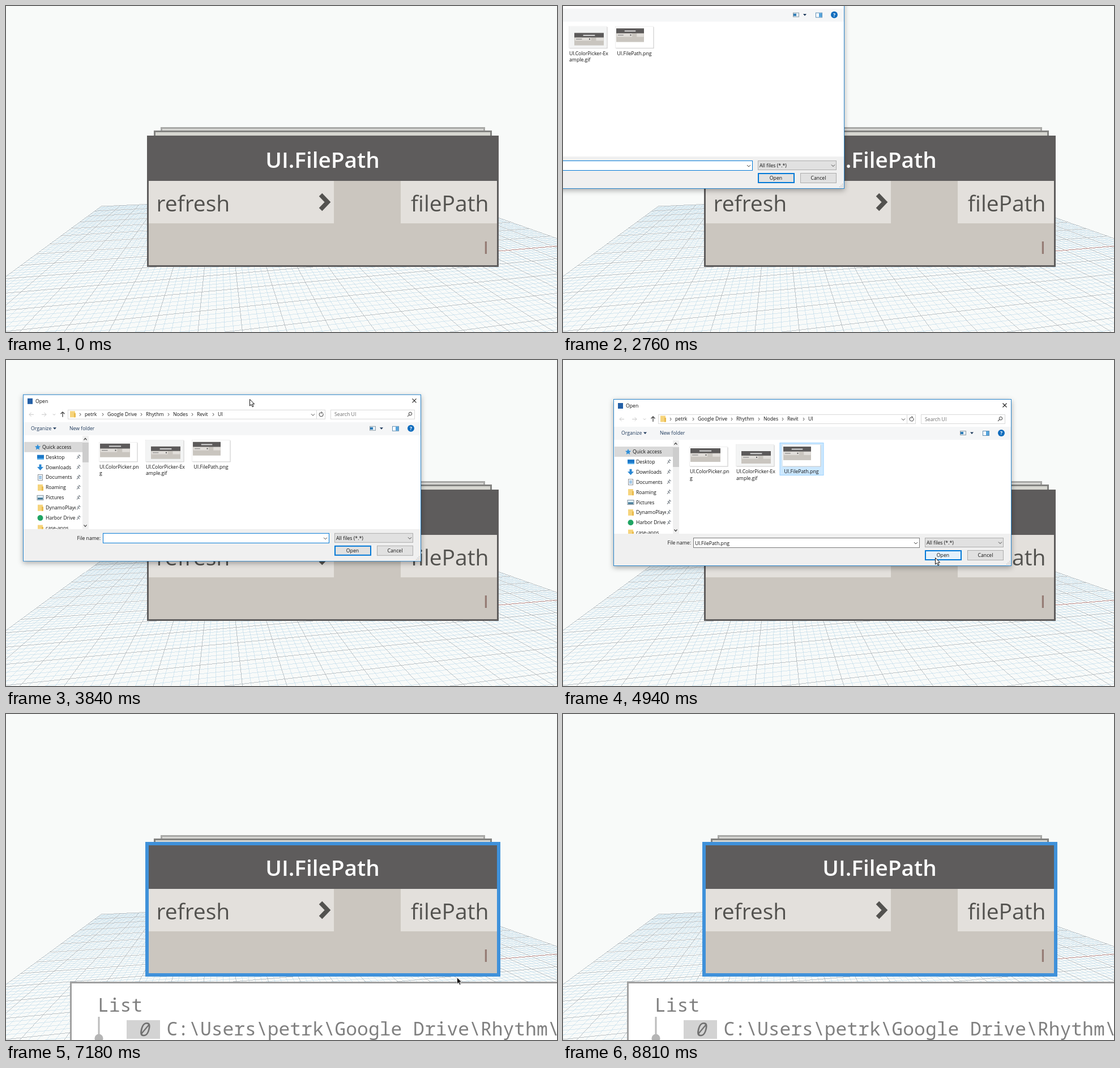
An HTML page that plays this animation: 973 px wide and 576 px high, repeating every 9590 ms.

```html
<!DOCTYPE html>
<html lang="en">
<head>
<meta charset="utf-8">
<title>File path node</title>
<style>
  html, body { margin: 0; width: 100%; height: 100%; overflow: hidden; background: #f8faf9; }
  svg { position: absolute; left: 0; top: 0; width: 973px; height: 576px; }
  text { font-family: "Open Sans", "Noto Sans", sans-serif; white-space: pre; }
  .port { font-size: 39px; fill: #53524f; }
  .mono { font: 33px "Noto Sans Mono", monospace; fill: #808080; }
  #dialog text { font-size: 8.7px; fill: #111; }
  #dialog { filter: drop-shadow(0 3px 5px rgba(0, 0, 0, .32)); }
</style>
</head>
<body>
<svg id="stage" viewBox="0 0 973 576"></svg>
<script>
const LOOP = 9590;
const $ = id => document.getElementById(id);

// ---------- svg helpers ----------
const rect = (x, y, w, h, fill, extra = '') =>
  `<rect x="${x}" y="${y}" width="${w}" height="${h}" fill="${fill}" ${extra}/>`;
const box = (x, y, w, h, fill, stroke, width = 1, extra = '') =>
  rect(x, y, w, h, fill, `stroke="${stroke}" stroke-width="${width}" ${extra}`);
const text = (x, y, s, extra = '') => `<text x="${x}" y="${y}" ${extra}>${s}</text>`;
const path = (d, stroke, width = 1, fill = 'none', extra = '') =>
  `<path d="${d}" stroke="${stroke}" stroke-width="${width}" fill="${fill}" ${extra}/>`;
const down = (x, y) => path(`M${x - 3} ${y - 1.5}l3 3l3 -3`, '#444');
const wedge = (x, y) => path(`M${x - 3} ${y - 1.5}h6l-3 3.5z`, 'none', 0, '#1e395b');
const folder = (x, y) => rect(x, y - 5.5, 9, 11, '#f6d47c') + rect(x + 7, y - 2, 3, 7.5, '#e9bb4e');

// perspective ground; thin lines without smoothing break up into dashes
function ground() {
  const corner = [168, 354], right = [3600, 200], far = [377, 200], near = 0.85;
  const project = (u, v) => {
    const a = 0.2 * u, b = -1.01 * v, w = 1 + a + b;
    return [0, 1].map(i => ((corner[i] + a * right[i] + b * far[i]) / w).toFixed(2)).join(' ');
  };
  const line = (u1, v1, u2, v2) => `M${project(u1, v1)}L${project(u2, v2)}`;
  let minor = '', major = '';
  for (let i = 0; i <= 100; i++) {
    const k = i / 100;
    const d = line(k, 0, k, near) + (k <= near ? line(0, k, 1, k) : '');
    if (i % 5) minor += d; else major += d;
  }
  return `<g shape-rendering="crispEdges">${path(minor, '#b2d3e6', .5)}${path(major, '#a3adb3', .7)}
    ${path(line(.5, .5, 1, .5), '#c58a86', .9)}</g>`;
}

function nodeCard() {
  return box(274.5, 215.5, 570, 20, '#d7d7d4', '#a9a9a7', 3) +
    box(262.5, 221.5, 594, 20, '#d6d6d0', '#838381', 3) +
    box(250.5, 230.5, 618, 229, '#cbc6bf', '#5e5c5c', 3) +
    rect(249, 229, 621, 80, '#5e5c5c') +
    rect(252, 309, 327, 75, '#e3e0dc') + rect(697, 309, 170, 75, '#e3e0dc') +
    text(559, 286, 'UI.FilePath', 'font-size="38.7" font-weight="600" fill="#fff" text-anchor="middle"') +
    text(265.5, 363, 'refresh', 'class="port"') +
    text(852.5, 363, 'filePath', 'class="port" text-anchor="end"') +
    path('M555.5 333.5L568 346.5L555.5 359.5', '#53524f', 7.7) +
    text(847.5, 438, 'l', 'font-size="28" font-weight="600" fill="#957c74" text-anchor="middle"') +
    box(249, 229, 621, 232, 'none', '#3f91da', 6, 'id="selected"');
}

function bubble() {
  return `<g id="bubble">${box(0, 474.5, 10, 10, '#fff', '#a0a0a0', 3, 'id="bubbleBox"')}
    ${text(0, 526, 'List', 'class="mono" id="listWord"')}
    <g id="listRow">${rect(162.5, 535, 3, 40, '#bcbcbc')}
    <circle cx="164" cy="573" r="7.5" fill="#b5b5b5"/>
    ${rect(213, 541, 59, 33, '#d3d3d3')}
    ${text(243, 569, '0', 'class="mono" text-anchor="middle" style="font-style:italic;fill:#707070"')}
    ${text(283.5, 568, 'C:\\Users\\petrk\\Google Drive\\Rhythm\\Nodes', 'class="mono"')}</g></g>`;
}

// small picture of a node
const mini = (x, y, w, h) => rect(x, y, w, h, '#c9c5bf') + rect(x, y, w, h * .36, '#5c5a5a') +
  rect(x + 1, y + h * .38, w * .55, h * .24, '#e1deda') + rect(x + w * .74, y + h * .38, w * .25, h * .24, '#e1deda') +
  rect(x + w * .3, y + h * .15, w * .4, 2, '#d8d8d8') + rect(x + 3, y + h * .47, w * .2, 1.2, '#888') +
  rect(x + w * .5, y + h * .45, 2, 2, '#555');
const thumb = (x, y, h) => rect(x + 1, y + 1, 67, h, '#c4c4c4') + box(x, y, 67, h, '#fff', '#e3e3e3', .6);

function sidebar() {
  const names = ['Quick access', 'Desktop', 'Downloads', 'Documents', 'Roaming', 'Pictures',
    'DynamoPlayer', 'Harbor Drive', 'case-apps'];
  const icons = [
    y => path(`M115 ${y - 5}l1.5 3.4l3.6 .4l-2.7 2.4l.8 3.6l-3.2 -1.8l-3.2 1.8l.8 -3.6l-2.7 -2.4l3.6 -.4z`, 'none', 0, '#2f8fd8'),
    y => rect(114, y - 4, 12, 8, '#1b78c8') + rect(114, y + 2, 12, 2, '#5fb4ee'),
    y => path(`M117.5 ${y - 5}h4v4.5h3.5l-5.5 6l-5.5 -6h3.5z`, 'none', 0, '#2a87d3'),
    y => box(115.5, y - 5, 8, 10, '#fff', '#8a9199') + path(`M117 ${y - 2}h5m-5 2h5m-5 2h5`, '#4b93cf'),
    y => folder(115, y),
    y => box(114, y - 4, 11, 8, '#dff0fb', '#88949c') + rect(115, y, 9, 3, '#3d7390'),
    y => folder(115, y),
    y => `<circle cx="119.5" cy="${y}" r="5" fill="#1fa463"/>`,
    y => folder(115, y)
  ];
  let s = rect(91, 153, 103, 18, '#d9d9d9');
  names.forEach((name, i) => {
    const y = 162 + i * 17.9;
    s += icons[i](y) + text(i ? 129 : 123, y + 3, name, i === 6 ? 'clip-path="url(#nameClip)"' : '');
    if (i && i < 8) s += path(`M184 ${y + 3}l3 -3m-2 -2l4 4m-2.5 -3l2.5 -2.5m-1.5 -1l3 3`, '#7d858c', 1.2);
  });
  return `<g clip-path="url(#listClip)">${s}</g>` + rect(194, 142, 11, 165, '#f0f0f0') +
    rect(194, 154, 11, 35, '#cdcdcd') +
    path('M196.5 149.5l2.5 -3l2.5 3M196.5 299.5l2.5 3l2.5 -3', '#444', 1.2);
}

function dialogTop() {
  const crumbs = [[198, 'petrk'], [238, 'Google Drive'], [306, 'Rhythm'], [354, 'Nodes'], [396, 'Revit'], [433, 'UI']];
  return rect(97, 76, 9, 10, '#2460a7') + text(111, 84, 'Open') +
    path('M776.5 76.5l7 7m0 -7l-7 7', '#222', 1.1) +
    path('M108 104.5h-8m3.5 -3.5l-3.5 3.5l3.5 3.5M122 104.5h8m-3.5 -3.5l3.5 3.5l-3.5 3.5', '#c9c9c9') +
    path('M142 103.5l2 2l2 -2', '#bbb') + path('M159 109v-9m-3.5 3.5l3.5 -3.5l3.5 3.5', '#444', 1.3) +
    box(168.5, 96.5, 454, 16, '#fff', '#d9d9d9') + path('M607.5 97v15', '#d9d9d9') + folder(172, 104) +
    crumbs.map(([x, s]) => path(`M${x - 9} 102l2 2.5l-2 2.5`, '#444') + text(x, 107, s)).join('') +
    down(601, 105) + path('M618.5 102.5a3.5 3.5 0 1 1 -3 -1.5m0 -1.5l2 1.7l-2 1.7', '#555', 1.1) +
    box(632.5, 96.5, 148, 16, '#fff', '#d9d9d9') + text(639, 107.5, 'Search UI', 'style="fill:#6d6d6d"') +
    path('M768 108l3 -3a2.7 2.7 0 1 1 .2 .2', '#555', 1.1) +
    rect(90, 118, 701, 23, '#f5f6f7') + text(103, 132, 'Organize', 'style="fill:#1e395b"') + wedge(145, 129) +
    text(171, 132, 'New folder', 'style="fill:#1e395b"') +
    box(701.5, 125.5, 10, 7, '#e9f3fa', '#8d9ba5') + rect(702, 127, 5, 4, '#2a79b5') + wedge(722, 129) +
    box(741.5, 125.5, 11, 8, '#fff', '#5f8fb5') + rect(747, 126, 5, 7, '#55a4dc') +
    `<circle cx="774" cy="129" r="6" fill="#0f6cbd"/>` +
    text(774, 132.2, '?', 'text-anchor="middle" style="fill:#fff;font-weight:700"') +
    sidebar() +
    box(301.5, 146.5, 77, 68, '#e5f3ff', 'none', 1, 'id="hoverGif"') +
    box(383, 146.5, 77, 57, '#cce8ff', '#99d1ff', 1, 'id="pick"') +
    thumb(223.5, 153.5, 34) + mini(225, 156, 53, 24) + text(224, 200, 'UI.ColorPicker.pn') + text(224, 211.5, 'g') +
    thumb(305.5, 149.5, 38) + rect(306, 150, 66, 37, '#f3f4f4') + mini(315, 161, 52, 22) +
    text(306, 200, 'UI.ColorPicker-Ex') + text(306, 211.5, 'ample.gif') +
    thumb(387.5, 149.5, 38) + mini(389, 153, 49, 24) +
    text(421, 200, 'UI.FilePath.png', 'text-anchor="middle"');
}

function dialogFoot() {
  let grip = '';
  for (let i = 0; i < 3; i++)
    for (let j = 0; j <= i; j++) grip += rect(788 - j * 2.5, 355 + i * 2.5, 1.2, 1.2, '#b5b5b5');
  return rect(90, 307, 701, 56, '#f0f0f0') + text(226, 326, 'File name:', 'text-anchor="end"') +
    box(230.5, 314.5, 399, 17, '#fff', '#7a7a7a', 1, 'id="field"') + down(623, 323.5) +
    text(233, 326.5, 'UI.FilePath.png', 'id="fileName"') +
    box(639.5, 314.5, 138, 16, '#e1e1e1', '#adadad') + text(642, 326, 'All files (*.*)') + down(772, 323) +
    box(640, 337, 63, 16, '#e1e1e1', '#0078d7', 2, 'id="open"') + text(671, 348, 'Open', 'text-anchor="middle"') +
    box(714.5, 336.5, 63, 17, '#e1e1e1', '#adadad') + text(746, 348, 'Cancel', 'text-anchor="middle"') + grip;
}

$('stage').innerHTML = `<defs>
  <clipPath id="listClip">${rect(90, 141, 115, 166, '#000')}</clipPath>
  <clipPath id="nameClip">${rect(125, 255, 57, 30, '#000')}</clipPath></defs>
  ${ground()}${nodeCard()}${bubble()}
  <g id="dialog">${box(89.5, 69.5, 702, 294, '#fff', '#2b86cc', 1, 'id="frame"')}
    <g id="dialogTop">${dialogTop()}</g>${dialogFoot()}</g>
  <g id="cursor">
    ${path('M.5 .5v11.5l2.7 -2.5l1.9 4.3l1.9 -.8l-1.9 -4.2h3.5z', '#111', 1, '#fff', 'id="arrow"')}
    ${path('M0 -8.5l3.5 4h-2.5v9h2.5l-3.5 4l-3.5 -4h2.5v-9h-2.5z', '#222', 1, '#fff', 'id="sizer"')}
  </g>`;

// ---------- timing ----------
// progress in n equal jumps, the first at a and the last at b
const jumps = (t, a, b, n) => {
  if (t < a) return 0;
  if (t >= b) return 1;
  return (Math.floor((t - a) / (b - a) * (n - 1) + 1e-6) + 1) / n;
};
const mix = (a, b, p) => a + (b - a) * p;
const within = (t, a, b) => t >= a && t < b;
const show = (id, on) => $(id).setAttribute('visibility', on ? 'inherit' : 'hidden');
const set = (id, attrs) => { for (const k in attrs) $(id).setAttribute(k, attrs[k]); };

// start, end, jumps, x, y
const moves = [
  [0, 0, 1, -20, 320],
  [1130, 1290, 3, 196, 391],
  [1740, 1740, 1, 122, 190],
  [1820, 1820, 1, 48, 48],
  [1900, 1900, 1, 221, -57],
  [2760, 3060, 5, 221, 33],
  [3290, 3450, 3, 194, 36],
  [3600, 3920, 5, 489, 77],
  [4070, 4310, 4, 425, 178],
  [4470, 4940, 7, 657, 349],
  [5080, 5080, 1, 657, 347],
  [5480, 5790, 5, 822, 432],
  [6550, 6800, 4, 812, 500],
  [7030, 7180, 3, 796, 465],
  [7250, 7960, 10, 740, 531],
  [8040, 8350, 5, 930, 565],
  [8420, 8730, 5, 962, 400]
];
function pointer(t) {
  let x = 0, y = 0;
  for (const [a, b, n, px, py] of moves) {
    if (t < a) break;
    const p = jumps(t, a, b, n);
    x = mix(x, px, p);
    y = mix(y, py, p);
  }
  return [x, y];
}

function opacityAt(t) {
  const fades = [[0, 0], [1360, .45], [1440, .93], [1520, 1], [5480, .7], [5560, .25], [5640, 0]];
  return fades.filter(f => t >= f[0]).pop()[1];
}

function render(t) {
  const alpha = opacityAt(t);
  const drag = jumps(t, 3600, 3920, 5);
  const extra = 90.5 * (1 - jumps(t, 2760, 3060, 5));
  const scale = 1 - .08 * (1 - alpha);
  show('dialog', alpha > 0);
  set('dialog', {
    opacity: alpha,
    transform: `translate(${-295 * (1 - drag)} ${-41 * (1 - drag)}) translate(440 216) scale(${scale}) translate(-440 -216)`
  });
  set('frame', { y: 69.5 - extra, height: 294 + extra });
  set('dialogTop', { transform: `translate(0 ${-extra})` });

  const picked = t >= 4390;
  show('hoverGif', within(t, 1820, 1900));
  show('pick', t >= 4230);
  set('pick', picked ? { fill: '#cce8ff', stroke: '#99d1ff' } : { fill: '#e5f3ff', stroke: 'none' });
  show('fileName', picked);
  set('field', { stroke: picked ? '#7a7a7a' : '#0078d7' });
  set('open', { fill: within(t, 5080, 5220) ? '#cce4f7' : t >= 4940 ? '#e5f1fb' : '#e1e1e1' });

  const grow = jumps(t, 6550, 6800, 4);
  const left = mix(250.5, 114.5, grow);
  show('bubble', t >= 6310);
  set('bubbleBox', { x: left, width: 2 * (559.5 - left), height: mix(80, 230, grow) });
  set('listWord', { x: left + 47.5 });
  show('listRow', grow === 1);
  show('selected', t >= 7030);

  const [x, y] = pointer(t);
  const sizing = within(t, 2760, 3290);
  show('cursor', within(t, 1130, 1900) || within(t, 2760, 8810));
  set('cursor', { transform: `translate(${Math.round(x)} ${Math.round(y)})` });
  show('arrow', !sizing);
  show('sizer', sizing);
  set('arrow', t >= 5600
    ? { fill: '#111', stroke: '#eee', 'stroke-width': .8 }
    : { fill: '#fff', stroke: '#111', 'stroke-width': 1 });
}

const begin = performance.now();
function tick() {
  render((performance.now() - begin) % LOOP);
  requestAnimationFrame(tick);
}
render(0);
requestAnimationFrame(tick);
</script>
</body>
</html>
```
